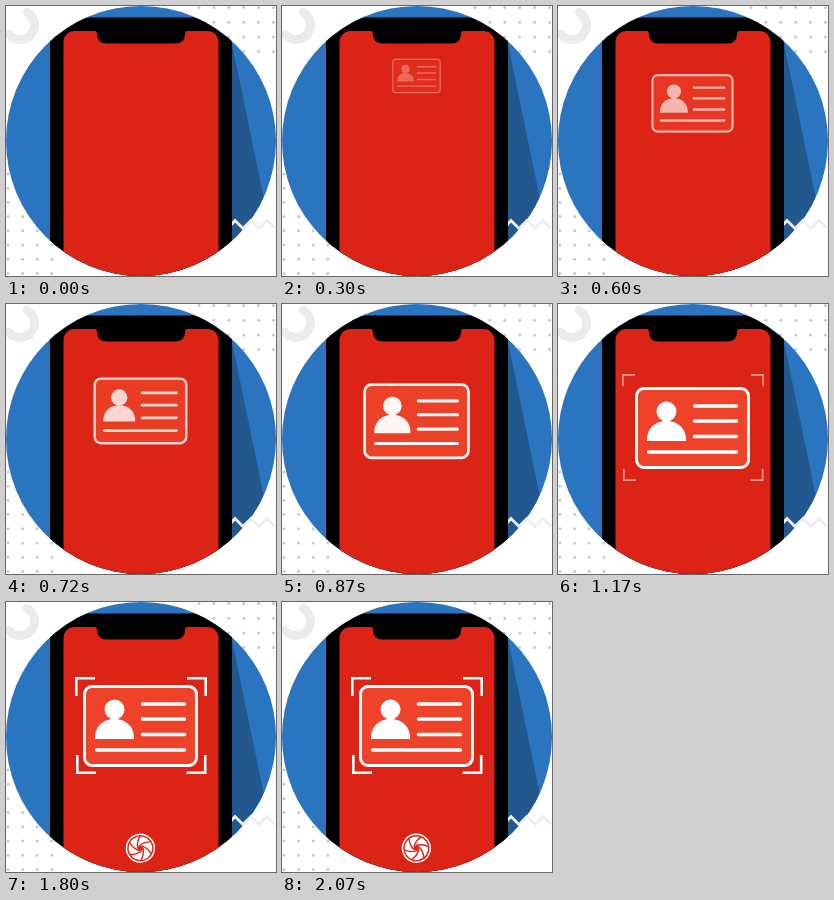
These frames come from a looping animation (270 by 270 pixels, 2100 ms). An HTML page with a canvas:

```html
<!DOCTYPE html>
<html lang="en">
<head>
<meta charset="utf-8">
<title>Card scan</title>
<style>
html, body { margin: 0; width: 100%; height: 100%; overflow: hidden; background: #fff; }
canvas { display: block; width: 270px; height: 270px; }
</style>
</head>
<body>
<canvas id="stage"></canvas>
<script>
const LOOP = 2100, STEP = 30, SIZE = 270;
const RED = '#db2416', BLUE = '#2b74c0', SHADE = '#23588f', TILE = '#ee432a';
const canvas = document.getElementById('stage');
const ctx = canvas.getContext('2d');
const dpr = window.devicePixelRatio || 1;
canvas.width = canvas.height = SIZE * dpr;

const progress = (t, from, span) => Math.min(1, Math.max(0, (t - from) / span));
const mix = (a, b, p) => a + (b - a) * p;

function fill(color, build) {
  ctx.beginPath();
  build();
  ctx.fillStyle = color;
  ctx.fill();
}

function stroke(color, width, build) {
  ctx.beginPath();
  build();
  ctx.strokeStyle = color;
  ctx.lineWidth = width;
  ctx.stroke();
}

const disc = (x, y, r) => ctx.arc(x, y, r, 0, Math.PI * 2);

function line(points) {
  points.forEach(([x, y], i) => i ? ctx.lineTo(x, y) : ctx.moveTo(x, y));
}

function layer(alpha, x, y, scale, draw) {
  if (alpha <= 0) return;
  ctx.save();
  ctx.globalAlpha = alpha;
  ctx.translate(x, y);
  ctx.scale(scale, scale);
  draw();
  ctx.restore();
}

function dots(x0, y0, cols, rows, gapX, gapY) {
  for (let r = 0; r < rows; r++)
    for (let c = 0; c < cols; c++)
      fill('#c9c9cb', () => disc(x0 + c * gapX, y0 + r * gapY, 1.5));
}

function backdrop() {
  ctx.fillStyle = '#fff';
  ctx.fillRect(0, 0, SIZE, SIZE);
  dots(193, 1.5, 6, 4, 14.9, 14.7);
  dots(2, 168, 4, 8, 14.6, 14.2);
  ctx.lineCap = 'round';
  stroke('#ebebeb', 9, () => ctx.arc(14, 19, 14.5, -1.05, 2.45));
  fill(BLUE, () => disc(135, 135, 135));
}

function phone() {
  ctx.save();
  ctx.beginPath();
  disc(135, 135, 135);
  ctx.clip();
  fill(SHADE, () => line([[222, 22], [226, 38], [258, 193], [258, 270], [222, 270]]));
  ctx.restore();

  ctx.lineCap = 'butt';
  ctx.lineJoin = 'miter';
  stroke('#efefef', 2.8, () => line([
    [224, 220], [229, 214.5], [237, 222.5], [245, 214.5],
    [253, 222.5], [261, 214.5], [269, 222.5]
  ]));

  ctx.save();
  ctx.beginPath();
  disc(135, 135, 135);
  ctx.clip();
  fill('#000', () => ctx.roundRect(44, 11.5, 182, 300, 24));
  fill(RED, () => ctx.roundRect(57.5, 25, 155, 280, 11));
  fill('#000', () => {
    ctx.moveTo(88, 24);
    ctx.quadraticCurveTo(91, 25, 91, 28);
    ctx.quadraticCurveTo(91, 37.5, 101, 37.5);
    ctx.lineTo(169, 37.5);
    ctx.quadraticCurveTo(179, 37.5, 179, 28);
    ctx.quadraticCurveTo(179, 25, 182, 24);
  });
  ctx.restore();
}

function card(t) {
  const p = progress(t, 60, 955);
  const s = 1 - 0.84 * Math.pow(1 - p, 1.3);
  layer(progress(t, 50, 860), 134.5, mix(30.3, 124, s), s, () => {
    const box = () => ctx.roundRect(-56, -39.5, 112, 79, 7.5);
    fill(TILE, box);
    stroke('#fff', 3, box);
    fill('#fff', () => disc(-26, -16.5, 10));
    fill('#fff', () => {
      ctx.moveTo(-45.5, 13);
      ctx.bezierCurveTo(-46, 0, -37, -7, -26, -7);
      ctx.bezierCurveTo(-15, -7, -6, 0, -6.5, 13);
    });
    ctx.lineCap = 'round';
    for (const y of [-22, -7, 8.5])
      stroke('#fff', 3.4, () => line([[2, y], [44, y]]));
    stroke('#fff', 3.4, () => line([[-44, 24], [44, 24]]));
  });
}

function brackets(t) {
  const p = progress(t, 1020, 300);
  const off = 10 * (1 - p), s = mix(0.3, 1, p);
  const corners = [[69, 75, 1, 1], [201, 75, -1, 1], [70, 172, 1, -1], [200.5, 172, -1, -1]];
  ctx.lineCap = 'butt';
  for (const [x, y, dx, dy] of corners)
    layer(p, x - dx * off, y - dy * off, s, () =>
      stroke('#fff', 2.6, () => line([
        [dx * 20, dy * 1.3], [dx * 1.3, dy * 1.3], [dx * 1.3, dy * 19]
      ])));
}

function shutter(t) {
  const p = progress(t, 1200, 250);
  layer(p, 134.4, 246.2, mix(0.3, 1, p), () => {
    ctx.rotate((t - 1200) / 1000 * Math.PI / 2);
    stroke('#fff', 1.5, () => disc(0, 0, 13.9));
    fill('#fff', () => disc(0, 0, 11.7));
    ctx.lineCap = 'butt';
    for (let i = 0; i < 6; i++) {
      stroke(RED, 1.4, () => {
        ctx.moveTo(-1.4, -2.4);
        ctx.quadraticCurveTo(5, -6.4, 10.8, -5.2);
      });
      ctx.rotate(Math.PI / 3);
    }
    fill(RED, () => disc(0, 0, 2.5));
  });
}

function frame(now) {
  const t = Math.floor((now % LOOP) / STEP) * STEP;
  ctx.setTransform(dpr, 0, 0, dpr, 0, 0);
  backdrop();
  phone();
  card(t);
  brackets(t);
  shutter(t);
}

const start = performance.now();
function tick() {
  frame(performance.now() - start);
  requestAnimationFrame(tick);
}
tick();
</script>
</body>
</html>
```
